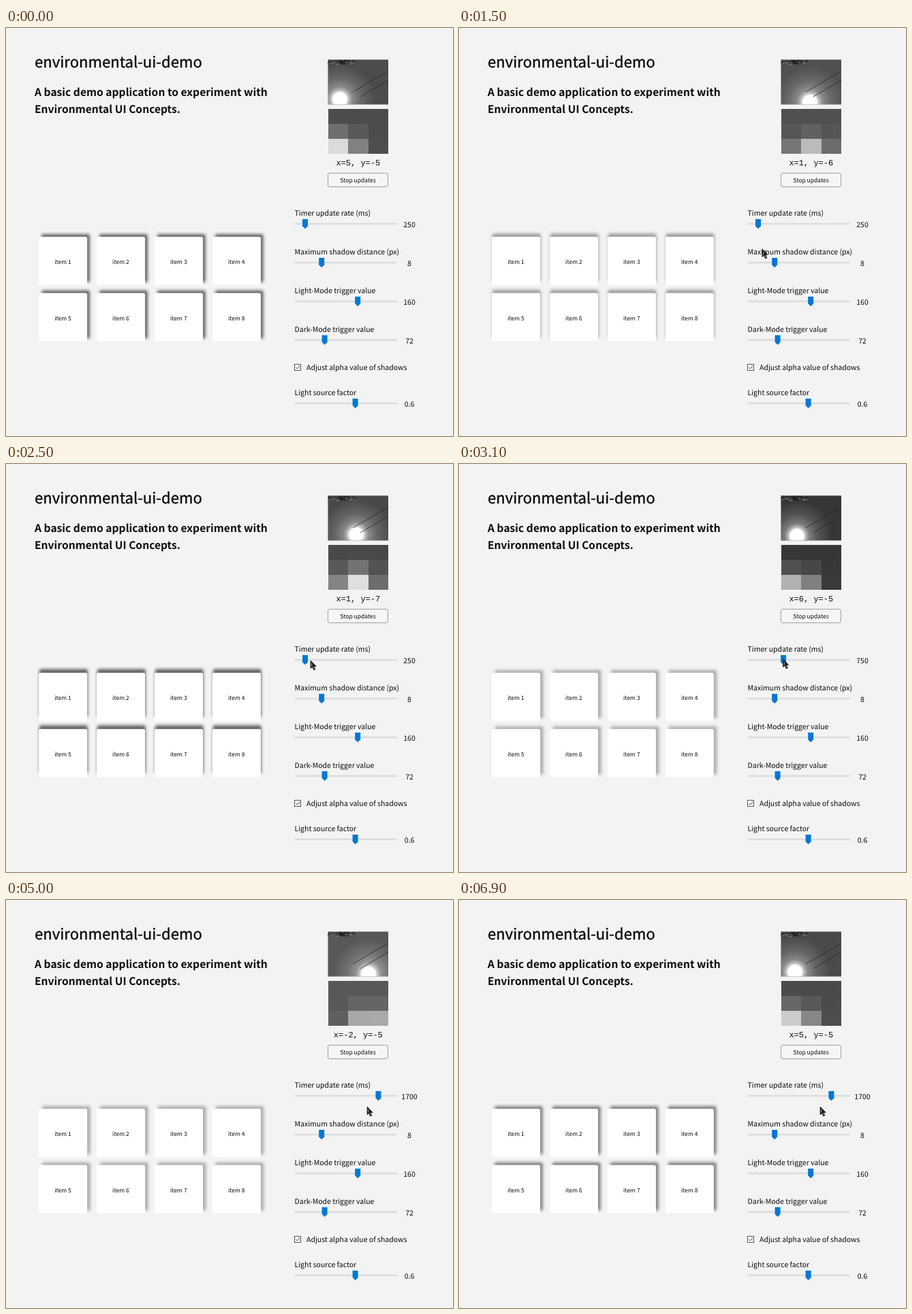
Write an HTML page that moves like this. It is 656 px wide and 600 px high and loops after 7100 ms.

```html
<!DOCTYPE html>
<html lang="en">
<head>
<meta charset="utf-8">
<title>environmental-ui-demo</title>
<style>
  html, body { margin: 0; width: 100%; height: 100%; overflow: hidden; background: #f3f3f3; }
  svg { display: block; width: 656px; height: 600px; }
  text {
    font: 10.5px "Noto Sans CJK JP", "Noto Sans CJK SC", "Noto Sans CJK", "Noto Sans", sans-serif;
    fill: #0c0c0c; white-space: pre; text-rendering: geometricPrecision;
  }
  text.title { font-size: 22.1px; stroke: #0c0c0c; stroke-width: .4px; }
  text.lead { font-size: 15.62px; font-weight: 600; }
  text.small { font-size: 8.5px; text-anchor: middle; }
  text.value { text-anchor: middle; }
  text.mono { font: 12px "Liberation Mono", monospace; text-anchor: middle; }
</style>
</head>
<body>
<svg id="stage" viewBox="0 0 656 600">
  <defs>
    <filter id="soft" filterUnits="userSpaceOnUse" x="30" y="285" width="370" height="195">
      <feGaussianBlur stdDeviation="1.9"/>
    </filter>
    <clipPath id="lens"><rect x="472.5" y="46.5" width="88.5" height="66"/></clipPath>
    <radialGradient id="sun">
      <stop offset="0" stop-color="#fff"/>
      <stop offset=".19" stop-color="#fff"/>
      <stop offset=".25" stop-color="#fff" stop-opacity=".65"/>
      <stop offset=".36" stop-color="#fff" stop-opacity=".34"/>
      <stop offset=".6" stop-color="#fff" stop-opacity=".15"/>
      <stop offset="1" stop-color="#fff" stop-opacity="0"/>
    </radialGradient>
  </defs>
</svg>
<script>
const LOOP = 7100, FADE = 200;
const stage = document.getElementById('stage');

function add(tag, attrs, parent = stage) {
  const el = document.createElementNS('http://www.w3.org/2000/svg', tag);
  for (const k in attrs) el.setAttribute(k, attrs[k]);
  parent.appendChild(el);
  return el;
}
function label(str, x, y, cls = '') {
  const el = add('text', { x, y, class: cls });
  el.textContent = str;
  return el;
}
const clamp = v => Math.max(0, Math.min(1, v));
const ease = v => v * v * (3 - 2 * v);
const mix = (a, b, k) => a + (b - a) * k;
const grey = v => `rgb(${v},${v},${v})`;

// Headings
label('environmental-ui-demo', 42, 57.6, 'title');
label('A basic demo application to experiment with', 42, 100, 'lead');
label('Environmental UI Concepts.', 42, 125, 'lead');

// Cards
const shade = add('g', {}, add('g', { filter: 'url(#soft)' }));
for (let i = 0; i < 8; i++) {
  const x = 48.2 + i % 4 * 84.9, y = i < 4 ? 307 : 389.7;
  const box = { x, y, width: 71, height: 71, rx: 2.5 };
  add('rect', box, shade);
  add('rect', { ...box, fill: '#fff' });
  label('item ' + (i + 1), x + 35.3, y + 40.2, 'small');
}

// Camera view
const cam = add('g', { 'clip-path': 'url(#lens)' });
const sky = add('rect', { x: 472, y: 46, width: 90, height: 67 }, cam);
const sun = add('circle', { r: 52, fill: 'url(#sun)' }, cam);
add('path', {
  d: 'M562 63L509 94M562 76L520 101', stroke: '#222', 'stroke-opacity': .75, fill: 'none'
}, cam);
let seed = 7;
const rnd = () => (seed = seed * 16807 % 2147483647) / 2147483647;
for (let i = 0; i < 46; i++) {
  add('rect', {
    x: 472 + rnd() * 38, y: 46 + rnd() * 6, width: 2 + rnd() * 4, height: 1.5 + rnd() * 1.5,
    fill: rnd() < .75 ? '#222' : '#777', opacity: .7
  }, cam);
}

// Mean brightness grid
const cells = Array.from({ length: 9 }, (_, i) => add('rect', {
  x: 473 + i % 3 * 29.33, y: 119 + Math.floor(i / 3) * 22,
  width: 29.5, height: 22, 'shape-rendering': 'crispEdges'
}));
const coords = label('', 516.8, 202, 'mono');

add('rect', {
  x: 472.5, y: 213.5, width: 88, height: 20, rx: 2.5, fill: '#f6f6f6', stroke: '#a0a0a0'
});
label('Stop updates', 516.5, 227, 'small');

// Sliders
function slider(name, y, x, value) {
  label(name, 423.5, y - 12.3);
  add('rect', { x: 423.5, y: y - 1.3, width: 150.5, height: 2.6, fill: '#dcdcdc' });
  const thumb = add('path', { d: 'M-4-7H4V3.2L0 7.2L-4 3.2Z', fill: '#0078d7' });
  thumb.setAttribute('transform', `translate(${x} ${y})`);
  return { thumb, y, out: label(value, 592, y + 4.8, 'value') };
}
const rate = slider('Timer update rate (ms)', 288, 439, '250');
slider('Maximum shadow distance (px)', 345, 463.2, '8');
slider('Light-Mode trigger value', 402, 516.2, '160');
slider('Dark-Mode trigger value', 458.8, 467.6, '72');
slider('Light source factor', 552, 512.6, '0.6');

// Checkbox
add('rect', { x: 423.5, y: 494.5, width: 9, height: 9, fill: '#fff', stroke: '#555' });
add('path', { d: 'M425.4 499l2 2.1 3.7-4.2', fill: 'none', stroke: '#333' });
label('Adjust alpha value of shadows', 441, 503.3);

const arrow = add('g', {});
add('path', {
  d: 'M0 0V11.8L2.6 9.5L4.6 14L7 13L5.2 8.6H8.4Z',
  fill: '#1a1a1a', stroke: '#1a1a1a', 'stroke-width': .6, 'stroke-linejoin': 'round'
}, arrow);
add('path', { d: 'M1.7 4V8.6M4.4 9.6L5.6 12.3', stroke: '#ddd', 'stroke-width': .8 }, arrow);

// Timer updates: time, lamp x, lamp y, ambient grey, vertical shadow offset
const updates = [
  [0, 490, 103, 76, -5], [250, 515, 107, 80, -6], [500, 544, 105, 80, -5],
  [750, 492, 103, 79, -5], [1250, 515, 107, 80, -6], [1750, 544, 105, 80, -5],
  [2250, 514, 102, 73, -7], [2850, 496, 104, 54, -5],
  [5000, 532, 107, 88, -5], [6700, 493, 104, 74, -5]
];

// Everything the page shows follows from lamp position and ambient light
function measure([, sx, sy, ambient, y]) {
  const power = 145 - 7 * (sy - 103);
  const u = (sx - 473) / 29.33, v = (sy - 46) / 22;
  const means = cells.map((_, i) => {
    const dx = i % 3 + .5 - u, dy = Math.floor(i / 3) + .5 - v;
    return Math.round(ambient + power * Math.exp(-(dx * dx + dy * dy) / .85));
  });
  const x = Math.round((521 - sx) / 6 * 76 / ambient);
  return { x, y, sx, sy, ambient, means, alpha: (Math.max(...means) - 135) / 150 };
}
const scenes = updates.map(measure);

// Pointer stops: time, x, y
const stops = [
  [300, 590, 470], [800, 445, 325], [2000, 445, 325], [2350, 447, 289], [2600, 447, 289],
  [2850, 440, 287], [3500, 547, 287], [3700, 547, 287], [4200, 530, 304]
];
function pointerAt(t) {
  let i = 0;
  while (i < stops.length - 2 && t >= stops[i + 1][0]) i++;
  const [t0, x0, y0] = stops[i], [t1, x1, y1] = stops[i + 1];
  const k = ease(clamp((t - t0) / (t1 - t0)));
  return [mix(x0, x1, k), mix(y0, y1, k)];
}

function draw(t) {
  let i = updates.length - 1;
  while (updates[i][0] > t) i--;
  const now = scenes[i], prev = scenes[Math.max(0, i - 1)];
  const k = ease(clamp((t - updates[i][0]) / FADE));
  const blend = key => mix(prev[key], now[key], k);

  shade.setAttribute('transform', `translate(${blend('x') * .78} ${blend('y') * .78})`);
  shade.setAttribute('fill-opacity', blend('alpha'));
  sky.setAttribute('fill', grey(now.ambient));
  sun.setAttribute('cx', now.sx);
  sun.setAttribute('cy', now.sy + 2);
  now.means.forEach((v, n) => cells[n].setAttribute('fill', grey(v)));
  coords.textContent = `x=${now.x}, y=${now.y}`;

  const [px, py] = pointerAt(t);
  arrow.setAttribute('transform', `translate(${px} ${py})`);
  arrow.setAttribute('visibility', t < 300 ? 'hidden' : 'visible');

  const pull = t < 2850 ? 0 : t > 3500 ? 1 : clamp((px - 440) / 107);
  const ms = 250 + Math.round(pull * 29) * 50;
  rate.out.textContent = ms;
  rate.thumb.setAttribute('transform', `translate(${439 + (ms - 250) * .0741} ${rate.y})`);
}

const start = performance.now();
function frame() {
  draw((performance.now() - start) % LOOP);
  requestAnimationFrame(frame);
}
draw(0);
requestAnimationFrame(frame);
</script>
</body>
</html>
```
